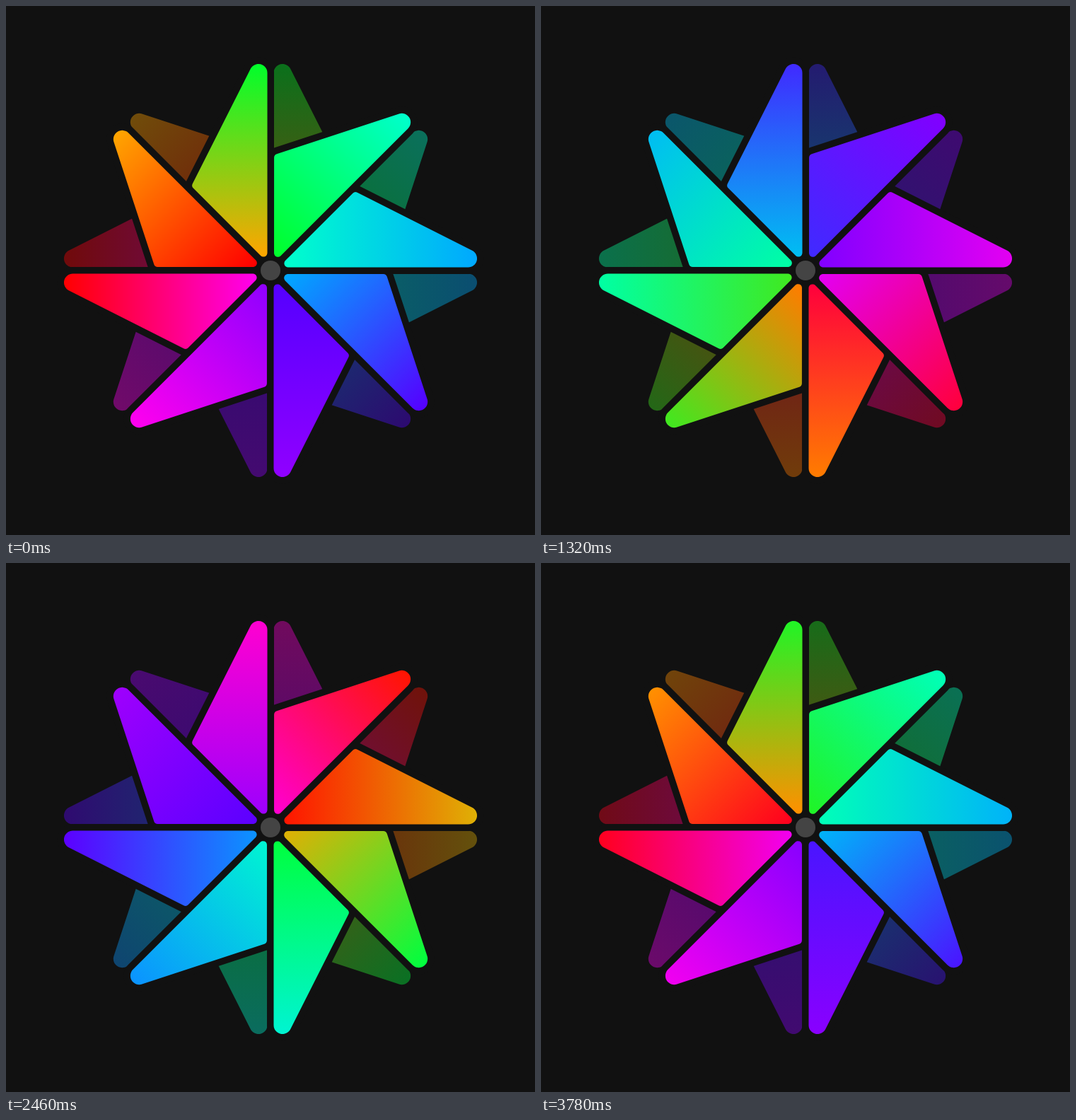
Animation, 748 px wide and 748 px high, one loop 3.84 s. Source, as an HTML page with a canvas:

```html
<!DOCTYPE html>
<html>
<head>
<meta charset="utf-8">
<style>
  html, body { margin: 0; height: 100%; overflow: hidden; background: #111; }
  canvas { display: block; }
</style>
</head>
<body>
<canvas width="748" height="748"></canvas>
<script>
const ctx = document.querySelector('canvas').getContext('2d');
const BLADES = 8, STEP = 60, LOOP = 3840, BACKGROUND = '#111';
const palette = [
  [255, 0, 0], [255, 165, 0], [0, 255, 43], [0, 255, 204],
  [0, 168, 255], [85, 0, 255], [144, 0, 255], [255, 0, 238]
];

// One blade, pointing up, just left of the vertical axis.
const blade = new Path2D();
blade.moveTo(-4.5, -150);
blade.arcTo(-4.5, -332, -112, -119.2, 12.5);
blade.arcTo(-112, -119.2, -4.5, -11.6, 5.5);
blade.arcTo(-4.5, -11.6, -4.5, -150, 5.5);
blade.closePath();

function colorAt(position) {
  const i = Math.floor(position), mix = position - i;
  const from = palette[i % BLADES], to = palette[(i + 1) % BLADES];
  return `rgb(${from.map((c, k) => Math.round(c + (to[k] - c) * mix))})`;
}

function eachBlade(paint) {
  for (let i = 0; i < BLADES; i++) {
    ctx.save();
    ctx.translate(374, 374);
    ctx.rotate(i * 2 * Math.PI / BLADES);
    paint(i);
    ctx.restore();
  }
}

function draw(now) {
  const time = Math.floor((now % LOOP) / STEP) * STEP;
  const shift = 1 + time / LOOP * BLADES;

  function fillBlade(i) {
    const gradient = ctx.createLinearGradient(0, -20, 0, -292);
    gradient.addColorStop(0, colorAt(i + shift));
    gradient.addColorStop(1, colorAt(i + shift + 1));
    ctx.fillStyle = gradient;
    ctx.fill(blade);
  }

  ctx.fillStyle = BACKGROUND;
  ctx.fillRect(0, 0, 748, 748);

  // Dim mirrored blades behind, then gaps, then the bright blades.
  eachBlade(i => {
    ctx.scale(-1, 1);
    ctx.globalAlpha = 0.4;
    fillBlade(i);
  });
  eachBlade(() => {
    ctx.strokeStyle = BACKGROUND;
    ctx.lineWidth = 19;
    ctx.stroke(blade);
  });
  eachBlade(fillBlade);

  ctx.fillStyle = '#444';
  ctx.beginPath();
  ctx.arc(374, 374, 14, 0, 2 * Math.PI);
  ctx.fill();
}

function tick() {
  draw(performance.now());
  requestAnimationFrame(tick);
}
tick();
</script>
</body>
</html>
```
